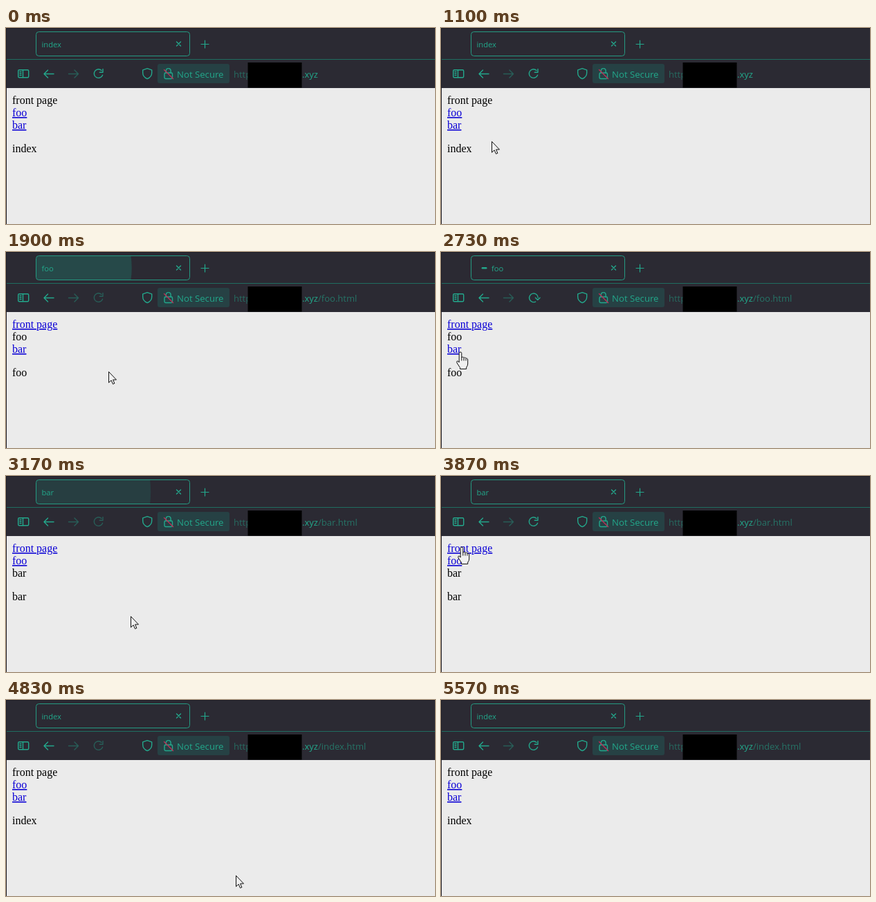
Recreate the animation shown at these times as an HTML page. Size 620 px wide and 284 px high, loop 5.6 s.

```html
<!DOCTYPE html>
<html lang="en">
<head>
<meta charset="utf-8">
<title>index</title>
<style>
  html, body { margin: 0; width: 100%; height: 100%; overflow: hidden; background: #2b2a33; }
  svg { display: block; }
  .ui { font-family: "Open Sans", "Noto Sans", sans-serif; font-size: 13px; fill: #22a88b; }
  .page { font-family: "Liberation Serif", "Times New Roman", serif; font-size: 16px; fill: #000; }
  .page .link { fill: #0b00d6; text-decoration: underline; }
  .icon { fill: none; stroke: #23a88c; stroke-width: 1.4; stroke-linecap: round; stroke-linejoin: round; }
  .dim { opacity: .42; }
  .cursor { fill: #f0f0f0; stroke: #111; stroke-width: 1; stroke-linejoin: round; }
</style>
</head>
<body>
<svg width="620" height="284" viewBox="0 0 620 284">
  <defs><clipPath id="tabClip"><rect x="44" y="6" width="221" height="34" rx="3.5"/></clipPath></defs>
  <rect width="620" height="284" fill="#2b2a33"/>
  <rect y="45" width="620" height="1" fill="#1f6d61"/>
  <rect y="87" width="620" height="197" fill="#ebebeb"/>
  <path d="M.5 0V284M0 .5H620" stroke="#1c1b24"/>

  <circle id="burst" cx="59" cy="23" fill="#12b896" clip-path="url(#tabClip)"/>
  <rect x="43.5" y="5.5" width="222" height="35" rx="4" fill="none" stroke="#259a82"/>
  <rect id="throbber" y="22" height="2.5" rx="1.2" fill="#23a88c"/>
  <text id="title" class="ui" y="27.5" style="font-size:11.2px"></text>
  <path class="icon" d="M246.5 20l6 6m0-6l-6 6"/>
  <path class="icon" style="stroke-width:1.2" d="M282 23.5h11m-5.500-5.500v11"/>

  <g class="icon">
    <rect x="17.700" y="60.700" width="15" height="11" rx="1.500"/>
    <path d="M24.500 61v10.500M20 63.500h2M20 66h2M20 68.500h2"/>
    <path d="M69 66.500H55m5.500-5.500L55 66.500l5.500 5.500"/>
    <path class="dim" d="M90.500 66.500h14m-5.500-5.500l5.500 5.500-5.500 5.500"/>
    <g id="reload"><path d="M139.600 68.200A6.300 6.300 0 1 1 138 61.500M140 59.500V64.200H135.300"/></g>
    <path id="stop" d="M128.500 61l10 10m0-10l-10 10"/>
    <path d="M204.200 58.700l6.500 2.200v4c0 4-2.600 7-6.500 8.700-3.900-1.700-6.500-4.700-6.500-8.700v-4z"/>
  </g>

  <rect x="219" y="52" width="104" height="28" rx="3" fill="#264144"/>
  <g class="icon">
    <rect x="229" y="65" width="11.500" height="8.500" rx="1.700"/>
    <path d="M231.300 65v-3a3.400 3.400 0 0 1 6.800 0v3"/>
    <path d="M228.500 60.500l13 13" stroke="#c22f58"/>
  </g>
  <text class="ui" x="247" y="72" style="font-size:13.200px">Not Secure</text>
  <text class="ui" x="329" y="72" opacity=".5">http</text>
  <text class="ui" x="428" y="72">.xyz</text>
  <text id="path" class="ui" x="451" y="72" opacity=".58"></text>
  <rect x="349.500" y="50" width="78" height="36.500"/>

  <g class="page">
    <text class="nav" x="9" y="110">front page</text>
    <text class="nav" x="9" y="128">foo</text>
    <text class="nav" x="9" y="146">bar</text>
    <text id="body" x="9" y="180"></text>
  </g>

  <g id="cursor" class="cursor">
    <path id="arrow" d="M.5 .5V16.300L4.100 12.900 6.500 18.400 8.900 17.400 6.600 12.100H11.500Z"/>
    <path id="hand" d="M-1.800 1.500Q-1.800 0 0 0T1.800 1.500V8Q2 7 3.500 7.200T5 8.500Q5.300 7.600 6.700 8T8 9.500Q8.400 8.800 9.500 9.200T10.700 11V17Q10.700 20 8.700 22V24.500H-.5V22.500L-4.800 16Q-5.800 13.800-4.600 13T-1.800 15Z M1.800 8V12.500M5 9V12.500M8 10V12.500"/>
  </g>
</svg>
<script>
const LOOP = 5600, BURST = 375;
const pages = ["index", "foo", "bar"];
const linkWidths = [66, 22, 20];
const loads = [
  { page: 1, click: 1360, swap: 1610, done: 1740 },
  { page: 2, click: 2690, swap: 2840, done: 2960 },
  { page: 0, click: 4000, swap: 4175, done: 4195 }
];
// time, x, y of the pointer tip
const track = [
  [570, 340, 260], [1100, 73, 164], [1300, 24, 125], [1580, 24, 125],
  [1860, 148, 173], [2340, 148, 173], [2650, 28, 145], [2740, 28, 145],
  [2960, 160, 199], [3140, 180, 203], [3590, 180, 203], [3850, 30, 103],
  [4060, 30, 103], [4330, 237, 203], [4630, 331, 236], [4780, 331, 236],
  [4830, 332, 254], [5500, 332, 254]
];

const $ = id => document.getElementById(id);
const navs = [...document.querySelectorAll(".nav")];
const show = (el, on) => el.setAttribute("visibility", on ? "visible" : "hidden");
const clamp = v => Math.max(0, Math.min(1, v));
const smooth = u => u * u * (3 - 2 * u);
const setText = (el, s) => { if (el.textContent !== s) el.textContent = s; };

function pointerAt(t) {
  const i = track.findIndex(k => k[0] > t);
  if (i < 1) return null;
  const [t0, x0, y0] = track[i - 1], [t1, x1, y1] = track[i];
  const u = smooth((t - t0) / (t1 - t0));
  return [x0 + (x1 - x0) * u, y0 + (y1 - y0) * u];
}

function drawPage(t) {
  const shown = loads.filter(l => t >= l.swap).pop();
  const page = shown ? shown.page : 0;
  setText($("title"), pages[page]);
  setText($("body"), pages[page]);
  setText($("path"), shown ? `/${pages[page]}.html` : "");
  navs.forEach((el, i) => el.classList.toggle("link", i !== page));
  return page;
}

function drawLoading(t) {
  const load = loads.filter(l => t >= l.click).pop();
  const since = load ? t - load.click : Infinity;
  const after = load ? t - load.done : Infinity;
  const busy = after < 0;

  $("title").setAttribute("x", after < 145 ? 73 : 51.5);
  show($("throbber"), busy);
  if (busy) {
    const phase = since / 480 * Math.PI;
    const width = 3 + 5 * Math.abs(Math.cos(phase));
    $("throbber").setAttribute("x", 60 + 4 * Math.sin(phase) - width / 2 + 1.5);
    $("throbber").setAttribute("width", width);
  }

  const p = clamp(after / BURST);
  const spread = 1 - (1 - p) ** 1.65;
  show($("burst"), after >= 0 && p < 1);
  $("burst").setAttribute("r", 5 + 195 * spread);
  $("burst").setAttribute("opacity", .55 * (1 - spread));

  const stopping = busy && since > 150;
  show($("stop"), stopping);
  show($("reload"), !stopping);
  $("reload").setAttribute("transform", `rotate(${busy ? since * 1.1 : 0} 133.5 66.500)`);
  $("reload").setAttribute("opacity", after >= 145 && after < 650 ? .42 : 1);
}

function drawPointer(t, page) {
  const tip = pointerAt(t);
  show($("cursor"), tip);
  show($("arrow"), false);
  show($("hand"), false);
  if (!tip) return;
  const [x, y] = tip.map(Math.round);
  const row = Math.floor((y - 97) / 18);
  const onLink = row in pages && row !== page && x >= 9 && x <= 9 + linkWidths[row];
  show($(onLink ? "hand" : "arrow"), true);
  $("cursor").setAttribute("transform", `translate(${x} ${y})`);
}

function draw(t) {
  const page = drawPage(t);
  drawLoading(t);
  drawPointer(t, page);
}

const start = performance.now();
function tick() {
  draw((performance.now() - start) % LOOP);
  requestAnimationFrame(tick);
}
tick();
</script>
</body>
</html>
```
